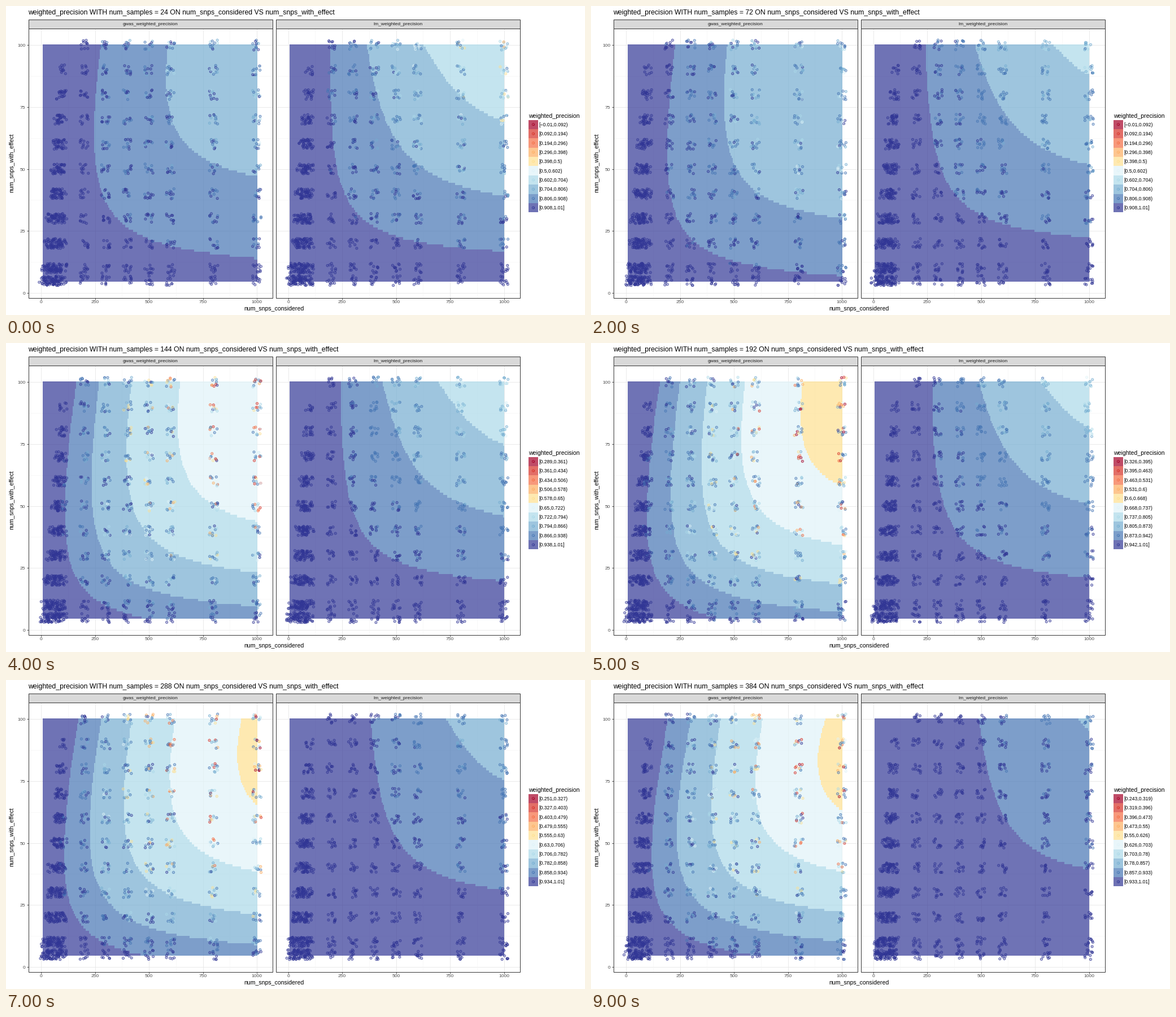
A matplotlib script that plays this animation: 1025x547 px, repeating every 10 s.

```python
import numpy as np
import matplotlib.pyplot as plt
from matplotlib.animation import FuncAnimation
from matplotlib.colors import ListedColormap
from matplotlib.patches import Rectangle

W, H, DPI = 1025, 547, 100
plt.rcParams["font.family"] = "Liberation Sans"

PALETTE = ["#a50026", "#d73027", "#f46d43", "#fdae61", "#fee090",
           "#e0f3f8", "#abd9e9", "#74add1", "#4575b4", "#313695"]
CMAP = ListedColormap(PALETTE)
TILE_ALPHA = 0.7

PANEL_L, PANEL_R, PANEL_T, PANEL_B = 39.5, 471.5, 39.5, 516.5
STRIP_T = 23.5
SHIFT = 437.5            # distance between the axes of the two panels
TILE_L, TILE_R, TILE_T, TILE_B = 65, 445, 68, 488
TILE_SHIFT = 437
ROWS, COLS = 96, 200
ZERO, SCALE = 62, 0.382  # x axis in pixels
X_HIGH = [200, 300, 400, 500, 600, 800, 1000]
Y_LEVELS = [5] + list(range(10, 101, 10))

# lowest class break for each number of samples
LOW = {24: -0.01, 48: -0.01, 72: -0.01, 96: 0.21, 144: 0.2894,
       192: 0.3263, 240: 0.29, 288: 0.2509, 336: 0.247, 384: 0.2427}
ORDER = list(LOW)
HIGH = 1.01


def y_px(v):
    return 508 - 4.39 * v


def gwas_shape(n):
    """Start, spread and bend of the contours along the top edge."""
    return (94 + 0.0008 * (n - 190) ** 2, 975 + 890 * np.exp(-n / 30),
            1.25 + min(1, 80 / n))


def lm_shape(n):
    return (92 + 0.1 * n + 0.00035 * n ** 2,
            800 + 7.2 * n + 0.004 * n ** 2, 1.55)


def gwas_anchors(n, x):
    """End height, shift at mid height and share at the knee."""
    end = 0.105 * (n / 24) ** -0.08 * x - 15
    mid = (0.0025 * end - 0.055) * (1000 - x) * SCALE - 0.0001 * n ** 2
    return end, mid, 0.165 + 0.0053 * end


def lm_anchors(n, x):
    rest = 1000 - x
    end = 100 - (0.98 + 2.2e-6 * n ** 2) * (0.066 + 5e-5 * rest) * rest
    mid = (0.007 * end - 0.08) * rest * SCALE
    return end, mid, 0.75 * (1 - np.exp(-end / 48))


MODELS = {"gwas": (gwas_shape, gwas_anchors), "lm": (lm_shape, lm_anchors)}


def contour(top, mid, knee, end, y):
    """x of a contour at heights y: a straight line plus a hyperbola
    through points at the top, at 40 % and 12 % of its height and its end."""
    h = end - TILE_T
    ys = np.array([TILE_T, end - 0.4 * h, end - 0.12 * h, end])
    xs = np.array([top, mid, knee, TILE_R])
    best = None
    for gap in h * np.geomspace(0.02, 2, 50):
        def basis(v):
            room = np.maximum(end + gap - v, 0.5)
            return np.column_stack([np.ones(len(v)), v / 100, 10 / room])
        coef = np.linalg.lstsq(basis(ys), xs, rcond=None)[0]
        error = np.abs(basis(ys) @ coef - xs).sum()
        if best is None or error < best[0]:
            best = error, gap, basis(y) @ coef
    _, gap, x = best
    return np.where(y < end + gap - 0.5, x, 9999)


def contours(key, n, y):
    """All class borders of one panel, one row for each."""
    shape, anchors = MODELS[key]
    start, spread, bend = shape(n)
    step = (HIGH - LOW[n]) / 10
    curves = []
    for k in range(1, 10):
        loss = k * step - 0.01
        x = start + spread * loss / (1 - bend * loss)
        if not 0 < x < 970:
            break
        end, shift, share = anchors(n, x)
        top = ZERO + SCALE * x
        mid = top + shift
        knee = mid + share * (TILE_R - mid)
        curves.append(contour(top, mid, knee, y_px(end), y))
    return np.array(curves)


def tile_classes(key, n):
    step = (TILE_B - TILE_T) / ROWS
    y = TILE_T + step * (np.arange(ROWS) + 0.5)
    x = TILE_L + (TILE_R - TILE_L) / COLS * (np.arange(COLS) + 0.5)
    passed = x[None, None, :] > contours(key, n, y)[:, :, None]
    return 9 - passed.sum(axis=0)


def jittered_points(rng):
    cells = [(x, y) for y in Y_LEVELS
             for x in [v for v in range(10, 101, 10) if v > y] + X_HIGH]
    pts = np.repeat(np.array(cells, float), 10, axis=0)
    return pts + rng.uniform(-1, 1, pts.shape) * [20, 2]


def point_classes(rng, key, n, x, y):
    """Class of each point: the local level with a skewed scatter."""
    edges = contours(key, n, y)
    count = len(edges)
    caps = TILE_R + 200 * np.arange(1, count + 1)
    edges = np.minimum(edges, caps[:, None])
    levels = np.r_[0, np.arange(count) + 0.5, count + 0.3]
    level = np.array([np.interp(px, np.r_[TILE_L, e, e[-1] + 200], levels)
                      for px, e in zip(x, edges.T)])
    level = level ** 2 / (level + 0.3)
    spread = 0.9 if key == "gwas" else min(0.8, 0.3 + 12 / n)
    noise = np.minimum(rng.exponential(1, len(x)), 2.3)
    offset = np.rint(level * (1 - spread + spread * noise))
    return 9 - np.minimum(9, offset).astype(int)


fig = plt.figure(figsize=(W / DPI, H / DPI), dpi=DPI, facecolor="white")
ax = fig.add_axes([0, 0, 1, 1])


def text(x, y, s, px, color="black", **kw):
    ax.text(x, y, s, fontsize=px * 72 / DPI, color=color, zorder=9, **kw)


def box(x0, y0, x1, y1, z, **kw):
    ax.add_patch(Rectangle((x0, y0), x1 - x0, y1 - y0, zorder=z, **kw))


def line(xs, ys, color, lw, z):
    ax.plot(xs, ys, color=color, lw=lw, zorder=z, solid_capstyle="butt")


def rings(x, y, classes, z):
    colors = [PALETTE[c] for c in classes]
    ax.scatter(x, y, s=8.5, facecolors="none", edgecolors=colors,
               linewidths=0.6, zorder=z)
    ax.scatter(x, y, s=0.9, c=colors, linewidths=0, zorder=z)


def draw_axes(l, r, zero, with_y):
    for i in range(9):
        color, lw = ("#f4f4f4", 0.4) if i % 2 else ("#e6e6e6", 0.6)
        gx, gy = zero + SCALE * 125 * i, y_px(12.5 * i)
        line([gx, gx], [PANEL_T, PANEL_B], color, lw, 1)
        line([l, r], [gy, gy], color, lw, 1)
        if i % 2:
            continue
        line([gx, gx], [PANEL_B, PANEL_B + 3], "#333333", 0.6, 6)
        text(gx, 526.5, str(125 * i), 8.5, "#4d4d4d", ha="center")
        if with_y:
            line([l - 3, l], [gy, gy], "#333333", 0.6, 6)
            text(l - 5, gy + 3, str(25 * i // 2), 8.5, "#4d4d4d", ha="right")


def draw_panel(key, n, side, rng):
    l, r = PANEL_L + 438 * side, PANEL_R + 438 * side
    draw_axes(l, r, ZERO + SHIFT * side, side == 0)

    dx = TILE_SHIFT * side
    ax.imshow(tile_classes(key, n), cmap=CMAP, vmin=-0.5, vmax=9.5,
              alpha=TILE_ALPHA, interpolation="nearest", aspect="auto",
              extent=(TILE_L + dx, TILE_R + dx, TILE_B, TILE_T), zorder=2)

    pts = jittered_points(rng)
    x, y = ZERO + SCALE * pts[:, 0], y_px(pts[:, 1])
    rings(x + SHIFT * side, y, point_classes(rng, key, n, x, y), 4)

    box(l, PANEL_T, r, PANEL_B, 5, fc="none", ec="#333333", lw=0.7)
    box(l, STRIP_T, r, PANEL_T, 5, fc="#d9d9d9", ec="#333333", lw=0.7)
    text((l + r) / 2, 34, key + "_weighted_precision", 8.5, "#1a1a1a",
         ha="center")


def draw_legend(low):
    text(925, 197.5, "weighted_precision", 10.5)
    breaks = [f"{round(v, 3):g}".replace("-", "\u2212")
              for v in np.linspace(low, HIGH, 11)]
    for i, color in enumerate(PALETTE):
        top = 201.5 + 16.38 * i
        box(925, top, 942, top + 16.38, 2, fc=color, alpha=TILE_ALPHA, lw=0)
        rings([933.5], [top + 8.2], [i], 3)
        close = "]" if i == 9 else ")"
        text(943, top + 11.3, f"[{breaks[i]},{breaks[i + 1]}{close}", 8.7)


def update(i):
    n = ORDER[i]
    rng = np.random.default_rng(n)
    ax.clear()
    ax.axis("off")
    text(39, 14.5, f"weighted_precision WITH num_samples = {n} ON "
         "num_snps_considered VS num_snps_with_effect", 12.3)
    for side, key in enumerate(MODELS):
        draw_panel(key, n, side, rng)
    text(474, 539, "num_snps_considered", 10.5, ha="center")
    text(10, 278, "num_snps_with_effect", 10.5, rotation=90, ha="center",
         va="center")
    draw_legend(LOW[n])
    ax.set_xlim(0, W)
    ax.set_ylim(H, 0)
    return []


anim = FuncAnimation(fig, update, frames=len(ORDER), interval=1000,
                     init_func=lambda: update(0), repeat=True)
plt.show()
```
